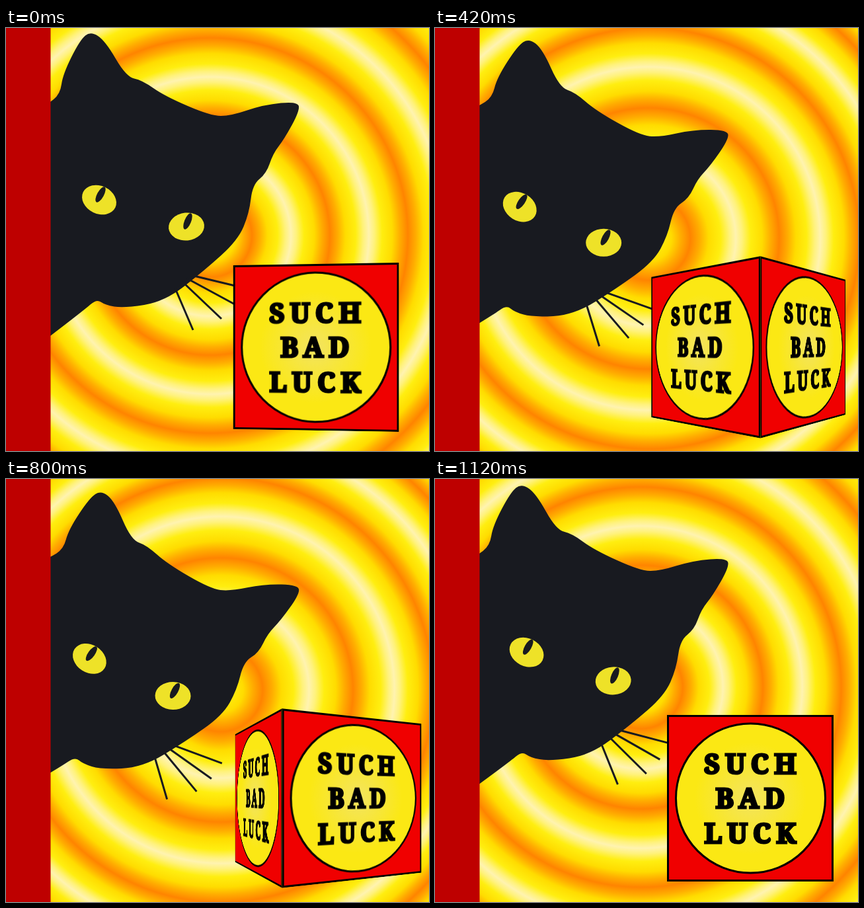
An HTML page with a canvas for the animation above (1220 ms loop, 640 px wide and 640 px high).

```html
<!DOCTYPE html>
<html lang="en">
<head>
<meta charset="utf-8">
<title>Such bad luck</title>
<style>
html, body { margin: 0; width: 640px; height: 640px; overflow: hidden; }
canvas { position: absolute; left: 0; top: 0; }
#scene { position: absolute; left: 351px; top: 357px; width: 252px; height: 252px; perspective: 600px; }
#cube { width: 252px; height: 252px; transform-style: preserve-3d; }
#cube svg { position: absolute; left: 0; top: 0; backface-visibility: hidden; }
text {
  font: 900 41px "Noto Serif", serif;
  letter-spacing: 8px;
  text-anchor: middle;
  stroke: #000;
  stroke-width: 3.2;
}
</style>
</head>
<body>
<canvas id="stage" width="640" height="640"></canvas>
<div id="scene"><div id="cube"></div></div>
<script>
const ctx = document.getElementById('stage').getContext('2d');
const cube = document.getElementById('cube');
const INK = '#181a20';
const LOOP = 1220, TICK = 53.3;

const words = ['SUCH', 'BAD', 'LUCK']
  .map((w, i) => `<text x="130" y="${89 + i * 52.5}">${w}</text>`).join('');
cube.innerHTML = [0, 90].map(turn =>
  `<svg width="252" height="252" style="transform:rotateY(${turn}deg) translateZ(126px)">
    <radialGradient id="glow${turn}">
      <stop stop-color="#f3e460"/><stop offset=".75" stop-color="#fbe814"/>
    </radialGradient>
    <rect x="1.5" y="1.5" width="249" height="249" fill="#f00000" stroke="#000" stroke-width="3"/>
    <circle cx="126.5" cy="126" r="113" fill="url(#glow${turn})" stroke="#000" stroke-width="3"/>
    ${words}
  </svg>`).join('');

// Control points of the head, joined by curves through their midpoints
const HEAD = [[20, 140], [62, 116], [82, 100], [86, 70], [112, 18], [128, 5], [150, 19],
  [182, 74], [206, 79], [240, 103], [310, 133], [340, 133], [390, 116], [442, 111],
  [444, 126], [421, 168], [404, 190], [394, 220], [373, 237], [368, 280], [351, 321],
  [300, 367], [240, 414], [178, 424], [150, 419], [137, 410], [118, 427], [0, 517]];

const head = new Path2D();
HEAD.slice(0, -1).forEach(([x, y], i) => {
  const [nx, ny] = HEAD[i + 1];
  head.quadraticCurveTo(x, y, (x + nx) / 2, (y + ny) / 2);
});
head.lineTo(0, 517);

const WHISKERS = [[256, 394, 283, 457], [267, 384, 326, 440], [274, 379, 346, 418], [280, 374, 359, 393]];

const mix = (a, b, p) => a + (b - a) * p;

// Half of one ring, from its orange line to the pale middle of the gap
const BANDS = [[0, '#ff8400'], [0.1, '#ffac00'], [0.2, '#ffdc00'],
  [0.33, '#ffee10'], [0.43, '#fff27c'], [0.5, '#fff3b0']];

function drawRings(p) {
  const x = mix(309, 328, p), y = mix(314, 320, p), max = 600;
  const gap = mix(118, 149, p), bend = mix(0, 9, p);
  const g = ctx.createRadialGradient(x, y, 0, x, y, max);
  for (let n = 0; n < 6; n++) {
    for (const side of [-1, 1]) {
      for (const [u, color] of BANDS) {
        const v = n + side * u;
        const r = 63 + gap * v - bend * v * v;
        if (r >= 0 && r <= max) g.addColorStop(r / max, color);
      }
    }
  }
  ctx.fillStyle = g;
  ctx.fillRect(0, 0, 640, 640);
}

function oval(color, x, y, rx, ry, tilt) {
  ctx.fillStyle = color;
  ctx.beginPath();
  ctx.ellipse(x, y, rx, ry, tilt, 0, 7);
  ctx.fill();
}

function drawEye(x, y, tilt, slit) {
  oval('#eee228', x, y, 27, 21, tilt);
  oval(INK, x + 2, y - 8, 5, 13, slit);
}

function drawCat(p) {
  ctx.save();
  ctx.translate(35, 145);
  ctx.rotate(p * 8.1 * Math.PI / 180);
  ctx.translate(-35, -145);
  ctx.fillStyle = ctx.strokeStyle = INK;
  ctx.fill(head);
  ctx.lineWidth = 3;
  ctx.beginPath();
  for (const [x, y, tipX, tipY] of WHISKERS) {
    ctx.moveTo(x, y);
    ctx.lineTo(tipX, tipY);
  }
  ctx.stroke();
  drawEye(141, 260, 0.45, 0.5);
  drawEye(273, 300.5, -0.1, 0.38);
  ctx.restore();
}

function draw(t) {
  // The turning point and the last pose each last two ticks
  const tick = Math.floor((t + 7) / TICK);
  const step = Math.min(20, tick - (tick > 12));
  const sway = (1 - Math.cos((step + (step > 12)) * Math.PI / 12)) / 2;
  drawRings(sway);
  drawCat(sway);
  ctx.fillStyle = '#be0000';
  ctx.fillRect(0, 0, 67.5, 640);
  // The cube rests for one step halfway round
  const angle = 4.5 * (step + (step < 10));
  cube.style.transform = `translateZ(-126px) rotateY(${-angle}deg)`;
}

const start = performance.now();
function frame() {
  draw((performance.now() - start) % LOOP);
  requestAnimationFrame(frame);
}
frame();
</script>
</body>
</html>
```
